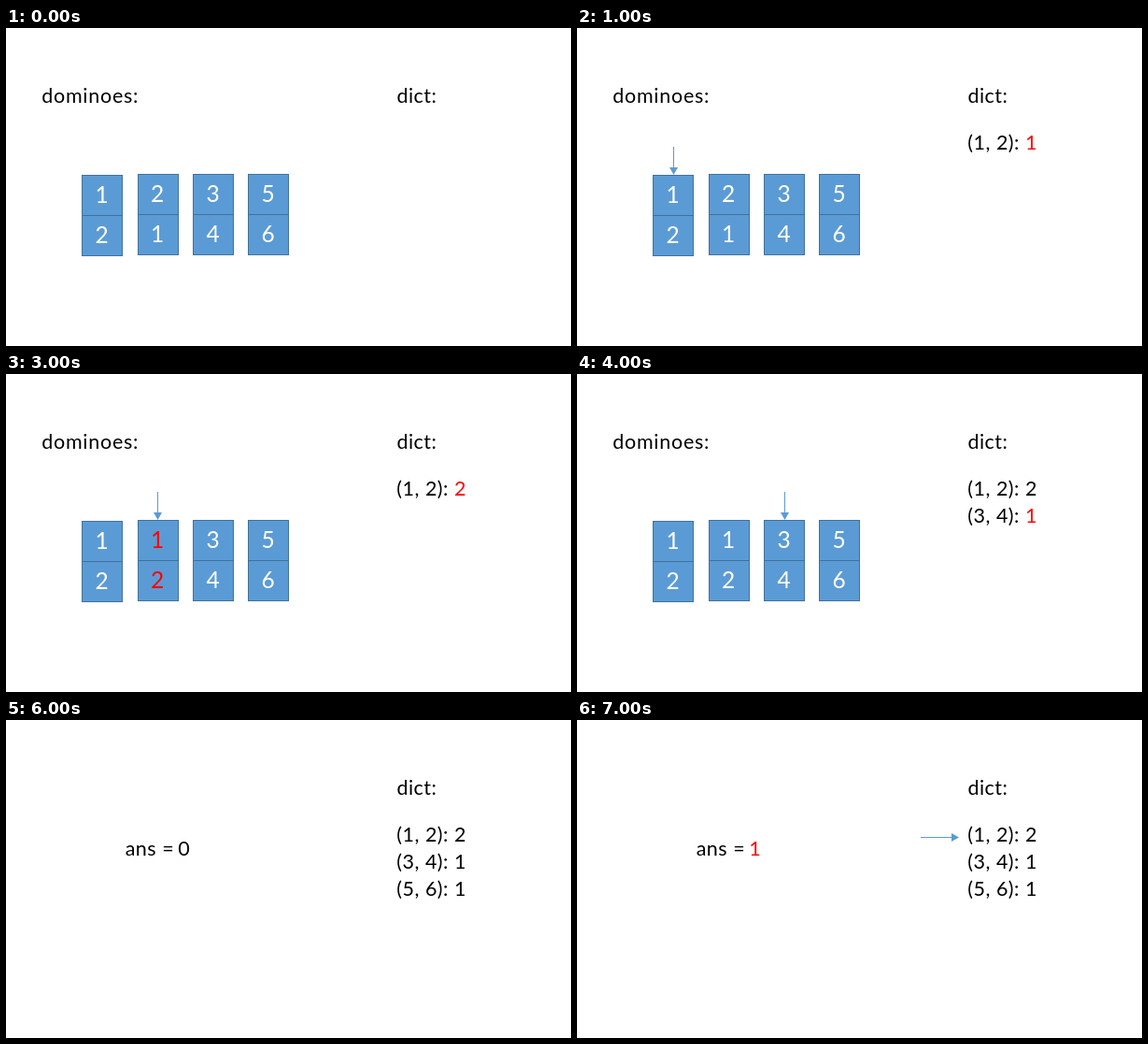
These frames come from a looping animation (605 by 340 pixels, 8000 ms). An HTML page:

```html
<!DOCTYPE html>
<html lang="en">
<head>
<meta charset="utf-8">
<title>Counting dominoes</title>
<style>
  html, body { margin: 0; width: 100%; height: 100%; overflow: hidden; background: #fff; }
  svg { display: block; width: 605px; height: 340px; }
  text { font: 21.5px Lato, Carlito, sans-serif; letter-spacing: .5px; fill: #000; }
  .title { letter-spacing: .75px; }
  .pip { font-size: 24.5px; letter-spacing: 0; text-anchor: middle; fill: #fff; }
  #cells rect { fill: #5b9bd5; stroke: #41719c; }
  .shaft { stroke: #5b9bd5; }
  .head { fill: #5b9bd5; }

  /* One loop is eight steps of 12.5 %; every change is a hard cut. */
  .scene, .ans, .pointer, .flipBefore, .flipAfter,
  .row1, .row2, .row3, .count, .zero, .last { animation: 8s step-end infinite; }

  .scene { animation-name: scene; }
  @keyframes scene { 0% { opacity: 1 } 75%, 100% { opacity: 0 } }
  .ans { animation-name: ans; }
  @keyframes ans { 0% { opacity: 0 } 75%, 100% { opacity: 1 } }
  .zero { animation-name: zero; }
  @keyframes zero { 0% { opacity: 1 } 87.5%, 100% { opacity: 0 } }
  .last { animation-name: last; fill: #f00; }
  @keyframes last { 0% { opacity: 0 } 87.5%, 100% { opacity: 1 } }

  .pointer { animation-name: pointer; }
  @keyframes pointer {
    0% { opacity: 0; transform: translate(103px, 157px) }
    12.5% { opacity: 1; transform: translate(103px, 157px) }
    25% { opacity: 1; transform: translate(162px, 156px) }
    50% { opacity: 1; transform: translate(222px, 156px) }
    62.5%, 100% { opacity: 1; transform: translate(281px, 156px) }
  }

  .flipBefore { animation-name: before; }
  @keyframes before { 0% { opacity: 1 } 37.5%, 100% { opacity: 0 } }
  .flipAfter { animation-name: flip; }
  @keyframes flip {
    0% { opacity: 0; fill: #f00 }
    37.5% { opacity: 1; fill: #f00 }
    50%, 100% { opacity: 1; fill: #fff }
  }

  .row1 { animation-name: row1; }
  @keyframes row1 { 0% { opacity: 0 } 12.5%, 100% { opacity: 1 } }
  .row2 { animation-name: row2; }
  @keyframes row2 { 0% { opacity: 0 } 50%, 100% { opacity: 1 } }
  .row3 { animation-name: row3; }
  @keyframes row3 { 0% { opacity: 0 } 62.5%, 100% { opacity: 1 } }

  /* A fresh count is red for one step. */
  .one { animation-name: one; }
  @keyframes one {
    0% { opacity: 1; fill: #f00 }
    25% { opacity: 1; fill: #000 }
    37.5%, 100% { opacity: 0; fill: #000 }
  }
  .two { animation-name: two; }
  @keyframes two {
    0% { opacity: 0; fill: #f00 }
    37.5% { opacity: 1; fill: #f00 }
    50%, 100% { opacity: 1; fill: #000 }
  }
  .row2 .count { animation-name: settle2; }
  @keyframes settle2 { 0% { fill: #f00 } 62.5%, 100% { fill: #000 } }
  .row3 .count { animation-name: settle3; }
  @keyframes settle3 { 0% { fill: #f00 } 75%, 100% { fill: #000 } }
</style>
</head>
<body>
<svg viewBox="0 0 605 340">
  <defs>
    <g id="cells">
      <rect x=".5" y=".5" width="43" height="43"/>
      <rect x=".5" y="43.5" width="43" height="43"/>
    </g>
  </defs>

  <g class="scene">
    <text class="title" x="38.2" y="80">dominoes:</text>
    <g transform="translate(81 157)">
      <use href="#cells"/>
      <text class="pip" x="21.7" y="30">1</text>
      <text class="pip" x="21.7" y="73">2</text>
    </g>
    <g transform="translate(141 156)">
      <use href="#cells"/>
      <g class="flipBefore">
        <text class="pip" x="21" y="30">2</text>
        <text class="pip" x="21" y="73">1</text>
      </g>
      <text class="pip flipAfter" x="21" y="30">1</text>
      <text class="pip flipAfter" x="21" y="73">2</text>
    </g>
    <g transform="translate(200 156)">
      <use href="#cells"/>
      <text class="pip" x="21.7" y="30">3</text>
      <text class="pip" x="21.7" y="73">4</text>
    </g>
    <g transform="translate(259 156)">
      <use href="#cells"/>
      <text class="pip" x="21.7" y="30">5</text>
      <text class="pip" x="21.7" y="73">6</text>
    </g>
    <g class="pointer">
      <path class="shaft" d="M.5-30V-7"/>
      <path class="head" d="M-4-8H5L.5 0Z"/>
    </g>
  </g>

  <g class="ans">
    <text x="127.7" y="144.5">ans =</text>
    <text class="zero" x="184.3" y="144.5">0</text>
    <text class="last" x="184.3" y="144.5">1</text>
  </g>

  <text x="418.4" y="80">dict:</text>
  <g class="row1">
    <text x="418.3" y="130">(1, 2):</text>
    <text class="count one" x="480" y="130">1</text>
    <text class="count two" x="480" y="130">2</text>
  </g>
  <g class="row2">
    <text x="418.3" y="159">(3, 4):</text>
    <text class="count" x="480" y="159">1</text>
  </g>
  <g class="row3">
    <text x="418.3" y="188">(5, 6):</text>
    <text class="count" x="480" y="188">1</text>
  </g>
  <g class="last">
    <path class="shaft" d="M368 125.5H402"/>
    <path class="head" d="M401 121V130L409 125.5Z"/>
  </g>
</svg>
</body>
</html>
```
